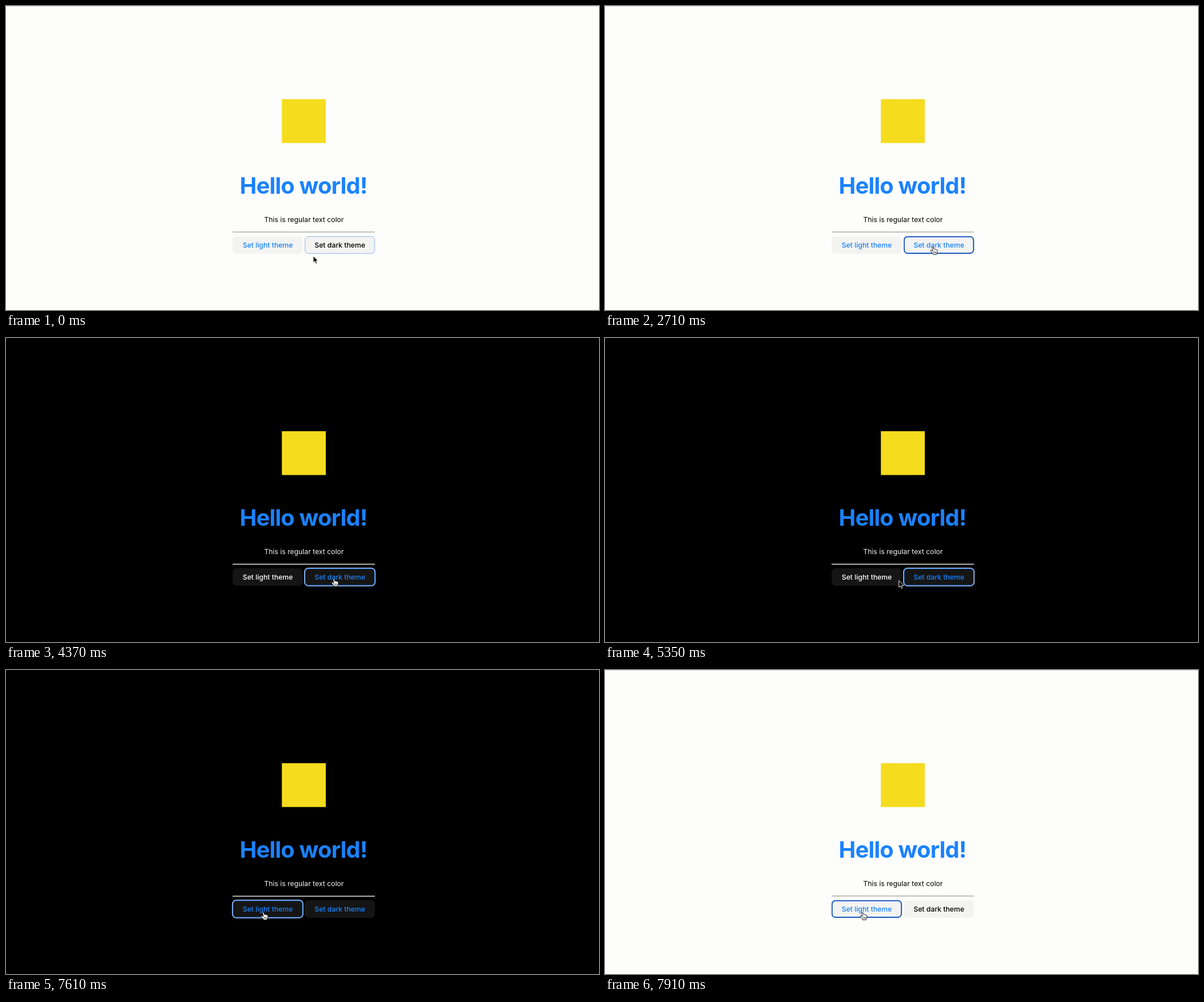
Recreate the animation shown at these times as an HTML page. Size 1044 px wide and 536 px high, loop 8 s.

```html
<!DOCTYPE html>
<html lang="en">
<head>
<meta charset="utf-8">
<title>Theme switch</title>
<style>
html, body { margin: 0; width: 100%; height: 100%; overflow: hidden; background: #fdfdfc; }
svg { display: block; width: 100vw; height: 100vh; }
text { font-family: Inter, Roboto, sans-serif; text-anchor: middle; }
.title { font-size: 40px; font-weight: 700; letter-spacing: -.78px; }
.body { font-size: 12.3px; }
.label { font-size: 12.3px; font-weight: 500; }
</style>
</head>
<body>
<svg viewBox="0 0 1044 536">
  <rect id="page" width="1044" height="536"/>
  <rect id="edge" width="1044" height="1" fill="#d4d4d4"/>
  <rect x="485.7" y="164.3" width="77.3" height="77.3" fill="#f5dc1e"/>
  <text class="title" x="523.8" y="331" fill="#1a82ff">Hello world!</text>
  <text class="body" id="copy" x="524.6" y="380.5">This is regular text color</text>
  <rect id="rule" x="399" y="398" width="250.5"/>
  <g id="buttons"></g>
  <g id="cursor" stroke-linejoin="round" stroke-linecap="round">
    <path id="arrow" fill="#000" stroke="#fff" stroke-width=".9"
      d="M0 0V11.6L2.7 9.1L4.6 13.5L6.6 12.6L4.7 8.4H8.4Z"/>
    <g id="hand" stroke="#000" stroke-width=".9">
      <path fill="#fff" d="M-1.2 1C-1.2-.4 .8-.4 1.1 1L2 4.4C2.3 3.4 4 3.5 4.3 4.8C4.7 4 6.1 4.2 6.3 5.3C6.9 4.7 8 5.1 8 6.3V8.8C8 10.4 6.9 11.3 6.6 13.6H.6C.3 11.5-2.2 9.8-3.6 7.7C-4.4 6.3-2.8 5.5-1.7 6.6L-.2 7.8Z"/>
      <path fill="none" stroke-width=".7" d="M1.8 8.7V11.4M3.6 8.7V11.4M5.4 8.7V11.4"/>
    </g>
  </g>
</svg>
<script>
const LOOP = 8000, DARK_AT = 2730, LIGHT_AT = 7730, FADE = 250;
const FOCUS_DARK = 2600, FOCUS_LIGHT = 7440;
const WIDTH = 123.5, HEIGHT = 30.7, TOP = 406, RADIUS = 6.5;
const BLUE = '#1a82f7';
const $ = id => document.getElementById(id);

// Pointer tip: time, x, y
const path = [
  [0, 541, 441], [250, 560, 448], [480, 630, 444], [760, 612, 422],
  [1600, 600, 421], [1900, 640, 427], [2450, 577, 424.5], [5060, 577, 424.5],
  [5480, 500, 429], [5910, 457, 427], [6650, 455, 426.5], [7100, 453, 427], [LOOP, 453, 427]
];
// Hover spans of each button
const hovers = { light: [[5400, LOOP + 1]], dark: [[640, 5290]] };

function setAttrs(el, attrs) {
  for (const name in attrs) el.setAttribute(name, attrs[name]);
}

function add(parent, tag, attrs) {
  const el = document.createElementNS('http://www.w3.org/2000/svg', tag);
  setAttrs(el, attrs);
  return parent.appendChild(el);
}

// Button outline, grown outwards by d
const outline = (x, d) => ({
  x: x - d, y: TOP - d, width: WIDTH + 2 * d, height: HEIGHT + 2 * d, rx: RADIUS + d
});

function makeButton(x, label) {
  const g = $('buttons');
  const box = add(g, 'rect', outline(x, 0));
  const border = add(g, 'rect', { ...outline(x, -.45), fill: 'none', stroke: '#1a6fe0' });
  const ring = add(g, 'rect', { fill: 'none' });
  const text = add(g, 'text', { class: 'label', x: x + WIDTH / 2 + .1, y: 426 });
  text.textContent = label;
  return { x, box, border, ring, text };
}

const buttons = {
  light: makeButton(399, 'Set light theme'),
  dark: makeButton(526, 'Set dark theme')
};

function tipAt(t) {
  const i = Math.max(1, path.findIndex(p => p[0] > t));
  const [a, b] = [path[i - 1], path[i]];
  const u = (t - a[0]) / (b[0] - a[0]);
  const e = u * u * (3 - 2 * u);
  return [a[1] + (b[1] - a[1]) * e, a[2] + (b[2] - a[2]) * e];
}

const isHovered = (name, t) => hovers[name].some(([from, to]) => t >= from && t < to);

function borderLevel(name, t) {
  const clamp = v => Math.min(1, Math.max(0, v));
  const level = hovers[name].reduce((sum, [from, to]) =>
    sum + clamp((t - from) / FADE) - clamp((t - to) / FADE), 0);
  return name === 'dark' && t < FADE ? clamp(.5 - t / FADE) : clamp(level);
}

function drawButton(name, t, dark) {
  const { x, box, border, ring, text } = buttons[name];
  const hovered = isHovered(name, t);
  const active = (name === 'dark') === dark;
  const focused = name === 'dark' ? t >= FOCUS_DARK && t < FOCUS_LIGHT : t >= FOCUS_LIGHT;
  box.setAttribute('fill', dark ? '#151515' : '#f3f3f2');
  setAttrs(border, {
    'stroke-width': focused && dark ? 1.4 : .9,
    opacity: focused && dark ? 1 : borderLevel(name, t)
  });
  setAttrs(ring, {
    ...outline(x, dark ? .45 : -.8),
    stroke: dark ? '#a9d2ff' : '#0f4fba', 'stroke-width': dark ? 1.3 : 1.7,
    visibility: focused ? 'visible' : 'hidden'
  });
  text.setAttribute('fill', hovered || active ? BLUE : dark ? '#fff' : '#000');
}

function render(t) {
  const dark = t >= DARK_AT && t < LIGHT_AT;
  $('page').setAttribute('fill', dark ? '#000' : '#fdfdfc');
  $('edge').setAttribute('visibility', dark ? 'hidden' : 'visible');
  $('copy').setAttribute('fill', dark ? '#f2f2f2' : '#000');
  setAttrs($('rule'), { fill: dark ? '#e4e4e0' : '#8c8c8c', height: dark ? 1.5 : 1 });
  drawButton('light', t, dark);
  drawButton('dark', t, dark);

  const overButton = isHovered('light', t) || isHovered('dark', t);
  $('cursor').setAttribute('transform', `translate(${tipAt(t)})`);
  $('arrow').setAttribute('visibility', overButton ? 'hidden' : 'visible');
  $('hand').setAttribute('visibility', overButton ? 'visible' : 'hidden');
}

const start = performance.now();
function tick() {
  render((performance.now() - start) % LOOP);
  requestAnimationFrame(tick);
}
render(0);
requestAnimationFrame(tick);
</script>
</body>
</html>
```
